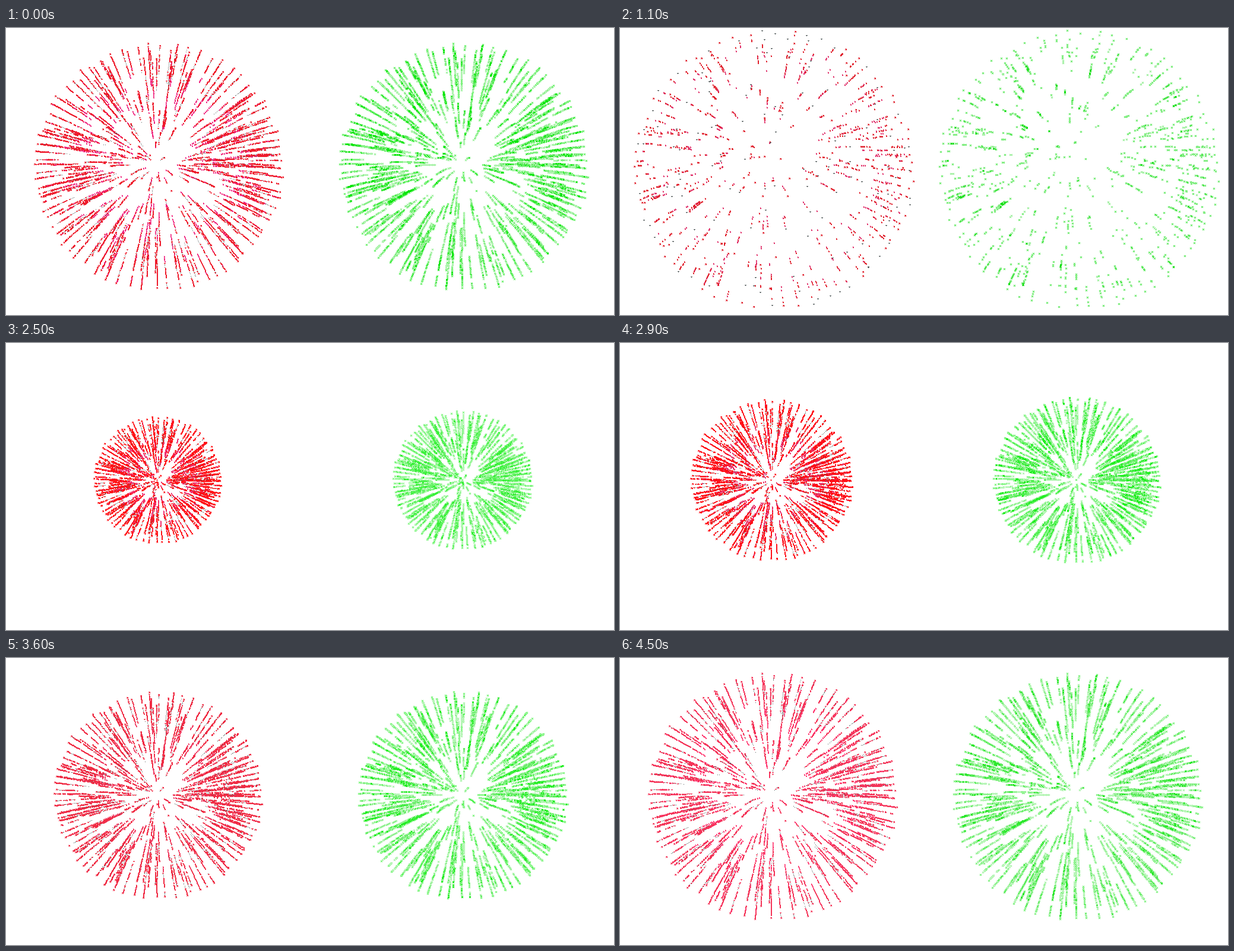
Write an HTML page with a canvas that moves like this. It is 1024x485 px and loops after 4600 ms.

```html
<!DOCTYPE html>
<html>
<head>
<meta charset="utf-8">
<style>
html, body { margin: 0; width: 100%; height: 100%; overflow: hidden; background: #fff; }
canvas { display: block; }
</style>
</head>
<body>
<canvas id="stage" width="1024" height="485"></canvas>
<script>
const W = 1024, H = 485, LOOP = 4600, STEP = 100, START = 2200;
const ctx = document.getElementById('stage').getContext('2d');
const image = ctx.createImageData(W, H);
const pixels = new Uint32Array(image.data.buffer);

const color = hex => (0xff000000 | (hex & 255) << 16 | hex & 0xff00 | hex >> 16) >>> 0;
const clamp = (v, lo = 0, hi = 1) => Math.min(hi, Math.max(lo, v));

// Repeatable noise in 0..1
function noise(a, b = 0) {
  let h = Math.imul(a + 17, 374761393) + Math.imul(b + 5, 668265263) | 0;
  h = Math.imul(h ^ h >>> 13, 1274126177);
  h = Math.imul(h ^ h >>> 15, 2246822519);
  return ((h ^ h >>> 16) >>> 0) / 4294967296;
}

// Shapes are lists of x, y pixel offsets
const DOT = [0, 0];
const PLUS = [0, 0, -1, 0, 1, 0, 0, 1];
const CROSS = [-1, -1, 1, -1, 0, 0, -1, 1, 1, 1];
const STAR = [...CROSS, 0, -1, 1, 0];
const BLOCK = [0, 0, 1, 0, 0, 1, 1, 1, 0, -1];

function stamp(x, y, shape, c) {
  x = Math.round(x);
  y = Math.round(y);
  for (let i = 0; i < shape.length; i += 2) {
    const px = x + shape[i], py = y + shape[i + 1];
    if (px >= 0 && px < W && py >= 0 && py < H) pixels[py * W + px] = c;
  }
}

// Directions seen as a filled disc with an even rim, denser to the left and right
const RIM = 76;
const rays = Array.from({ length: 330 }, (_, i) => {
  const rim = i < RIM;
  const turn = (rim ? (i + noise(i, 1) * 0.5) / RIM : noise(i, 1)) * 2 * Math.PI;
  const a = turn - 0.15 * Math.sin(2 * turn);
  const r = rim ? 0.96 + noise(i, 2) * 0.04 : 0.97 * Math.sqrt(noise(i, 2));
  return { x: Math.cos(a) * r, y: Math.sin(a) * r };
});

// End time, red, pink, strong green, pale green
const palette = [
  [300, 0xee1c2c, 0xf02880, 0x08e608, 0x62e862],
  [1200, 0xe0202c, 0xe0306a, 0x10de10, 0x5ce45c],
  [2200, 0xdc3448, 0xdc3448, 0x30e030, 0x50e650],
  [2900, 0xff1418, 0xf03070, 0x38f038, 0x6cf26c],
  [3500, 0xff1018, 0xe8306a, 0x22ee22, 0x74ee74],
  [4200, 0xf02c44, 0xf03c62, 0x26ee26, 0x70ec70],
  [4600, 0xf43458, 0xff3870, 0x2ce82c, 0x74ec74]
].map(([end, ...hues]) => [end, ...hues.map(color)]);
const GREY = color(0x545c5c);

function burst(cx, green, age, ms) {
  const [, red, pink, strong, pale] = palette.find(p => ms < p[0]);
  const late = ms < START;
  const open = age < 0 ? Math.sqrt(clamp((age + 0.4) / 0.4)) : 1;
  const lead = green ? 10 * Math.exp(-2 * Math.max(0, age)) : 0;
  const radius = a => (108 + 167 * (1 - Math.exp(-0.48 * a)) + lead) * open;
  const at = (ray, a) => {
    const r = radius(a), fall = a > 0 ? a * a : 0;
    return [cx + ray.x * r + 0.4 * fall, 232 + ray.y * r + 0.8 * fall];
  };
  const density = clamp(3.6 - age, 0.02, 0.92);
  const tip = clamp(1.35 - age * 0.2, 0.8, 1);
  const heads = late ? clamp(green ? (2150 - ms) / 900 : (2250 - ms) / 600) : 1;

  rays.forEach((ray, i) => {
    const span = clamp(0.6 + 0.6 * age, 0.5, 1.8) * (0.6 + 0.5 * noise(i, 3));
    const from = Math.max(-0.95, age - span);
    const length = Math.hypot(ray.x, ray.y) * (radius(age) - radius(from));
    const count = Math.max(2, Math.round(length / 2));
    for (let j = 0; j < count; j++) {
      const u = j / count, n = noise(i * 131 + j, 4), part = noise(i, 20 + (j >> 2));
      if (n > density || part > density + 0.02 || u > tip) continue;
      const [x, y] = at(ray, from + (age - from) * u);
      if (green) {
        stamp(x, y, CROSS, part < 0.45 ? strong : pale);
      } else if (part < 0.58) {
        stamp(x, y, BLOCK, u < 0.15 || n < 0.1 ? pink : red);
      } else {
        stamp(x, y, n < 0.4 ? PLUS : DOT, n < 0.4 ? red : GREY);
      }
    }
    if (noise(i, 6) > heads) return;
    const [x, y] = at(ray, age);
    if (green) stamp(x, y, CROSS, strong);
    else if (age > 3 && noise(i, 7) < 0.45) stamp(x, y, PLUS, GREY);
    else stamp(x, y, STAR, red);
  });

  // Embers left at the right
  const embers = 70 * clamp(age / 0.5) * clamp((2 - age) / 0.6);
  for (let i = 0; i < embers; i++) {
    const x = cx + 110 + (noise(i, 8) - 0.5) * 30;
    const y = 236 + (noise(i, 9) + noise(i, 10) - 1) * 38;
    stamp(x, y, green ? CROSS : BLOCK, green ? strong : red);
  }

  // Glowing core
  const core = 16 * clamp((0.4 - age) / 0.4);
  for (let i = 0; i < core; i++) {
    const x = cx - 2 + (noise(i, 11) - 0.5) * 9, y = 234 + (noise(i, 12) - 0.5) * 12;
    stamp(x, y, green ? CROSS : PLUS, green ? strong : red);
  }
}

let shown = -1;
function frame(now) {
  const ms = Math.floor(now % LOOP / STEP) * STEP;
  if (ms !== shown) {
    shown = ms;
    pixels.fill(0xffffffff);
    const age = ms < START ? 2 + ms / 1000 : ms / 1000 - 2.5;
    burst(255, false, age, ms);
    burst(769, true, age, ms);
    ctx.putImageData(image, 0, 0);
  }
  requestAnimationFrame(frame);
}
frame(performance.now());
</script>
</body>
</html>
```
